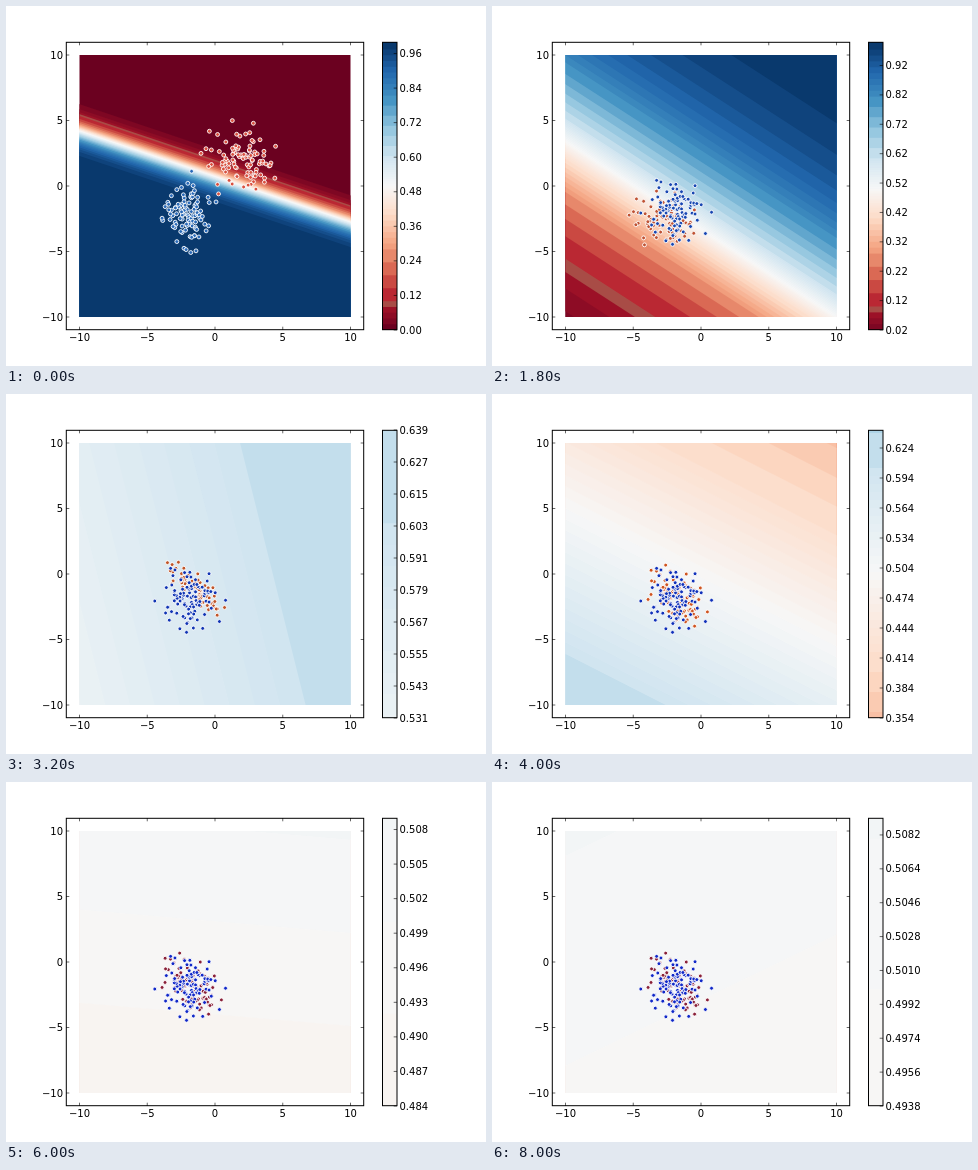
An HTML page for the animation above (8100 ms loop, 480 by 360 pixels).

```html
<!DOCTYPE html>
<html lang="en">
<head>
<meta charset="utf-8">
<title>Decision surface</title>
<style>
html, body { margin: 0; width: 100%; height: 100%; overflow: hidden; background: #fff; }
svg { display: block; }
text { font: 10px "DejaVu Sans", sans-serif; fill: #000; }
.line { fill: none; stroke: #000; stroke-width: 1; }
.tick { stroke: #000; stroke-width: .6; }
.dots { stroke: #fff; stroke-width: .9; }
</style>
</head>
<body>
<svg id="stage" width="480" height="360" viewBox="0 0 480 360">
  <defs>
    <clipPath id="plot"><rect x="73.5" y="49" width="271" height="262"/></clipPath>
    <clipPath id="scale"><rect x="376.5" y="36" width="14.5" height="288"/></clipPath>
  </defs>
</svg>
<script>
const NS = "http://www.w3.org/2000/svg";
const stage = document.getElementById("stage");
const OX = 209, OY = 180, UX = 13.55, UY = 13.1;
const TOP = 36, BOTTOM = 324;
const LOOP = 8100, STEP = 100;
const HOLDS = [4, 17, 30, 41, 53, 65, 79];
const DOTS = 100;

const clamp = (v, lo, hi) => Math.min(hi, Math.max(lo, v));
const mix = (a, b, f) => a + (b - a) * f;
const sigmoid = v => 1 / (1 + Math.exp(-v));
const logit = p => Math.log(p / (1 - p));
const rgb = hex => [1, 3, 5].map(i => parseInt(hex.slice(i, i + 2), 16));
const css = c => `rgb(${c.map(Math.round)})`;

// Logit of the surface: a * x + b * y + c
const PLANE = [
  [0, [-.66, -1.9, 1.37]],
  [9, [-.336, -.325, .572]],
  [18, [.164, .245, .807]],
  [26, [.046, .036, .614]],
  [40, [-.02, -.038, -.01]],
  [60, [.0004, .0045, -.014]],
  [80, [-.001, .002, .0058]]
];
// Red cloud: centre x, y, spread along and across, angle
const CLOUD = [
  [0, [236, 154, 16, 15, 0]],
  [9, [154, 240, 18, 9, -65]],
  [18, [173, 214, 14, 11, 0]],
  [26, [194, 190, 16, 2, 40]],
  [40, [186, 204, 15, 9, 40]]
];
const RED = [[0, rgb("#d9503f")], [26, rgb("#b5552f")], [40, rgb("#cf5420")], [60, rgb("#8a2038")]];
const BLUE = [[0, rgb("#2a6ab8")], [26, rgb("#1038b0")], [60, rgb("#1128c8")]];

const RAMP = ["#67001f", "#b2182b", "#d6604d", "#f4a582", "#fddbc7", "#f7f7f7",
  "#d1e5f0", "#92c5de", "#4393c3", "#2166ac", "#053061"].map(rgb);

// Value of a keyed track at a step
function at(track, step) {
  const next = track.findIndex(key => key[0] > step);
  if (next < 0) return track[track.length - 1][1];
  const [s0, v0] = track[next - 1], [s1, v1] = track[next];
  return v0.map((v, i) => mix(v, v1[i], (step - s0) / (s1 - s0)));
}

function ramp(p) {
  const v = clamp(p, 0, 1) * 10, i = Math.min(9, Math.floor(v));
  return css(RAMP[i].map((c, k) => mix(c, RAMP[i + 1][k], v - i)));
}

function add(parent, name, attrs = {}) {
  const el = document.createElementNS(NS, name);
  set(el, attrs);
  parent.appendChild(el);
  return el;
}

function set(el, attrs) {
  for (const k in attrs) el.setAttribute(k, attrs[k]);
}

// Evenly spread normal points with a little seeded jitter
function normals(seed) {
  const rnd = () => (seed = (seed * 16807) % 2147483647) / 2147483647;
  return Array.from({ length: DOTS }, (_, i) => {
    const r = Math.min(2.8, Math.sqrt(-2 * Math.log(1 - (i + .5) / DOTS)));
    const angle = i * 2.39996 + seed % 7 + rnd() * .5;
    return [r * Math.cos(angle) + (rnd() - .5) * .2, r * Math.sin(angle) + (rnd() - .5) * .2];
  });
}

const place = (pts, cx, cy, sx, sy) => pts.map(([u, v]) => [cx + u * sx, cy + v * sy]);
const firstBlue = place(normals(71), 181, 207, 11, 15);
const blue = place(normals(29), 184, 206, 13, 14);
const latent = normals(53);

// Colour bands of the surface
function bandWidth(p) {
  if (Math.abs(p - .5) < .099) return .008;
  if (p > .6 && p < .8) return .035;
  return p > .099 && p < .27 ? .045 : .02;
}

const bands = [];
for (let p = .02; p < .985; p += bandWidth(p)) {
  const dull = Math.abs(p - .08) < .005;
  bands.push({ p, color: dull ? "#a84c46" : ramp(p + bandWidth(p) / 2) });
}

const plotClip = add(stage, "g", { "clip-path": "url(#plot)" });
add(plotClip, "rect", { x: 73, y: 48, width: 272, height: 264, fill: ramp(.005) });
const surface = add(plotClip, "g");
const scale = add(stage, "g", { "clip-path": "url(#scale)" });
add(scale, "rect", { x: 376, y: TOP, width: 16, height: 288, fill: ramp(.005) });
for (const b of bands) {
  b.strip = add(surface, "rect", { y: -300, height: 600, fill: b.color });
  b.bar = add(scale, "rect", { x: 376, y: TOP, width: 16, fill: b.color });
}

const redGroup = add(stage, "g", { class: "dots" });
const blueGroup = add(stage, "g", { class: "dots" });
const redDots = latent.map(() => add(redGroup, "circle", { r: 1.95 }));
const blueDots = blue.map(() => add(blueGroup, "circle", { r: 1.95 }));

function tick(x1, y1, x2, y2) {
  return add(stage, "line", { class: "tick", x1, y1, x2, y2 });
}

function label(x, y, anchor, str = "") {
  const el = add(stage, "text", { x, y, "text-anchor": anchor });
  el.textContent = str;
  return el;
}

add(stage, "rect", { class: "line", x: 60.3, y: TOP + .3, width: 297.4, height: 287.4 });
add(stage, "rect", { class: "line", x: 376.5, y: TOP + .3, width: 14.5, height: 287.4 });
for (let v = -10; v <= 10; v += 5) {
  const x = OX + v * UX, y = OY - v * UY, str = String(v).replace("-", "\u2212");
  tick(x, BOTTOM, x, BOTTOM - 3.3);
  tick(x, TOP, x, TOP + 3.3);
  tick(60, y, 63.3, y);
  tick(358, y, 354.7, y);
  label(x, 335.3, "middle", str);
  label(57, y + 3.5, "end", str);
}
const marks = Array.from({ length: 12 }, () => ({
  line: tick(387.7, 0, 391, 0),
  text: label(393.5, 0, "start")
}));

// Round level step that gives at most 51 levels
function levelStep(range) {
  const base = 10 ** Math.floor(Math.log10(range / 51));
  return base * [1, 2, 3, 4, 5, 6, 8, 10].find(k => range / (k * base) <= 51);
}

function drawScale(lo, hi) {
  const step = levelStep(hi - lo);
  const first = Math.floor(lo / step + 1e-6), last = Math.ceil(hi / step - 1e-6);
  const yOf = p => BOTTOM - (p / step - first) / (last - first) * (BOTTOM - TOP);
  const stride = Math.ceil((last - first + 1) / 10);
  const ticks = [];
  for (let i = first; i <= last; i += stride) ticks.push(i * step);
  let digits = 2;
  while (digits < 6 && ticks.some(v => Math.abs(v - v.toFixed(digits)) > 1e-7)) digits++;
  for (const b of bands) b.bar.setAttribute("height", clamp(yOf(b.p), TOP, BOTTOM) - TOP);
  marks.forEach((m, i) => {
    const on = i < ticks.length, y = on ? yOf(ticks[i]) : 0;
    set(m.line, { y1: y, y2: y, visibility: on ? "visible" : "hidden" });
    m.text.setAttribute("y", y + 3.5);
    m.text.textContent = on ? ticks[i].toFixed(digits) : "";
  });
}

function drawSurface([a, b, c]) {
  const gx = a / UX, gy = -b / UY, len = Math.max(1e-6, Math.hypot(gx, gy));
  const turn = Math.atan2(gy, gx) * 180 / Math.PI;
  surface.setAttribute("transform", `translate(${OX} ${OY}) rotate(${turn})`);
  for (const band of bands) {
    const x = clamp((logit(band.p) - c) / len, -300, 300);
    set(band.strip, { x, width: 300 - x });
  }
  const reach = 10 * (Math.abs(a) + Math.abs(b));
  drawScale(sigmoid(c - reach), sigmoid(c + reach));
}

function drawDots(step) {
  const [x, y, along, across, angle] = at(CLOUD, step);
  const cos = Math.cos(angle * Math.PI / 180), sin = Math.sin(angle * Math.PI / 180);
  latent.forEach(([u, v], i) => set(redDots[i], {
    cx: x + u * along * cos - v * across * sin,
    cy: y + u * along * sin + v * across * cos
  }));
  (step < 1 ? firstBlue : blue).forEach(([cx, cy], i) => set(blueDots[i], { cx, cy }));
  redGroup.setAttribute("fill", css(at(RED, step)));
  blueGroup.setAttribute("fill", css(at(BLUE, step)));
}

let shown = -1;
function frame() {
  let step = Math.floor(performance.now() % LOOP / STEP);
  if (HOLDS.includes(step)) step--;
  if (step !== shown) {
    shown = step;
    drawSurface(at(PLANE, step));
    drawDots(step);
  }
  requestAnimationFrame(frame);
}
frame();
</script>
</body>
</html>
```
